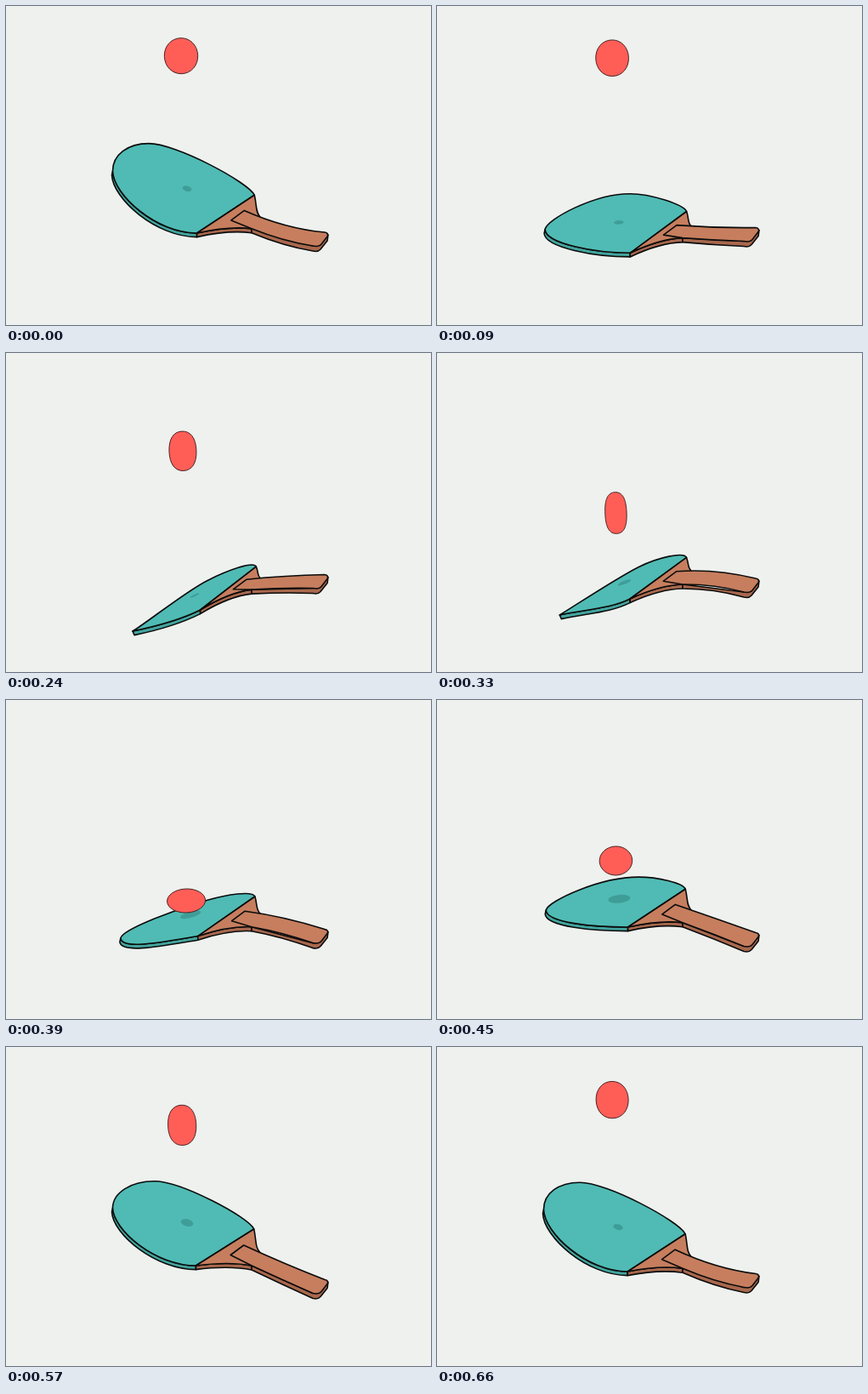
An HTML page with a canvas for the animation above (0.69 s loop, 500 by 375 pixels).

```html
<!DOCTYPE html>
<html lang="en">
<head>
<meta charset="utf-8">
<title>Bouncing ball</title>
<style>
html, body { margin: 0; width: 100%; height: 100%; overflow: hidden; background: #eef1ee; }
canvas { display: block; }
</style>
</head>
<body>
<canvas id="stage" width="500" height="375"></canvas>
<script>
const ctx = document.getElementById('stage').getContext('2d');
const LOOP = 690, STEP = 30;
const INK = '#0b0b0b', TEAL = '#4fbbb4', TEAL_SIDE = '#42a49d', WOOD = '#c67e5e', WOOD_SIDE = '#a8684d';

// Key poses: time, paddle height, handle end height, blade tip height
const PADDLE = [
  [0, 267, 267, 194], [150, 303, 259, 309], [240, 302, 261.5, 327], [330, 289, 266, 308],
  [450, 267, 274.5, 247], [570, 257, 274.5, 189], [660, 264, 267.5, 191]
];
// Ball: time, half width, half height
const SQUASH = [
  [0, 19.7, 21], [240, 16, 23.2], [345, 14, 22.8], [390, 22.5, 14], [450, 19.3, 17], [570, 16.6, 23.6]
];

const clamp = v => Math.min(1, Math.max(0, v));

// Smooth periodic interpolation through the key poses
function sample(rows, t) {
  const n = rows.length;
  const row = i => rows[(i + n) % n];
  const time = i => row(i)[0] + LOOP * Math.floor(i / n);
  let i = n - 1;
  while (rows[i][0] > t) i--;
  const slope = (k, c) => (row(k + 1)[c] - row(k)[c]) / (time(k + 1) - time(k));
  const tangent = (k, c) => {
    const before = time(k) - time(k - 1), after = time(k + 1) - time(k);
    return (slope(k - 1, c) * after + slope(k, c) * before) / (before + after);
  };
  const h = time(i + 1) - time(i), u = (t - time(i)) / h, v = 1 - u;
  return row(i).slice(1).map((a, j) => {
    const c = j + 1, b = row(i + 1)[c];
    return a * v * v * (1 + 2 * u) + b * u * u * (3 - 2 * u)
      + h * u * v * (v * tangent(i, c) - u * tangent(i + 1, c));
  });
}

function shape(d, fill, width = 1.6, ink = INK) {
  const path = new Path2D(d);
  ctx.fillStyle = fill;
  ctx.fill(path);
  ctx.lineWidth = width;
  ctx.strokeStyle = ink;
  ctx.stroke(path);
}

// How far the blade has flattened and bent, from the tip's drop below the joint
function bladeState(height, tipY) {
  const drop = tipY - height;
  const flat = clamp((drop + 73) / 98);
  return { drop, flat, slide: clamp(flat / .54), slant: clamp((drop + 20) / 38), sharp: clamp((drop - 2) / 16) };
}

function drawBlade(joint, top, tipY, { drop, flat, slide, slant, sharp }) {
  const tip = [125.5 + 23.5 * flat ** 3.5, tipY];
  const at = ([x, y], dx, dy) => [x + dx, y + dy];
  const crest = at([168 + 69 * slide, top[1]], 0, .83 * drop + 2.5 * slide - 7 * sharp);
  const back = 25 + 20 * (slide - slant), ahead = 32 - 9 * slide;
  const upper = `C${at(tip, 3 * slide + 15 * sharp, 8 * slide - 19)} ${at(crest, -back, back * slant / 2)} ${crest}
    C${at(crest, ahead, -ahead * slant / 2)} ${at(top, 4 * slide - 7, 8 * slide - 15)} ${top}`;
  const low1 = at(tip, 1 + 33 * sharp, 28 - 13 * slide - 22 * sharp);
  const low2 = at(joint, 8 * slide + 18 * sharp - 48, 11 * slant);
  const lower = `L${joint} C${low2} ${low1} ${tip}Z`;
  const dx = 3 * sharp - 1, dy = 4.6;
  shape(`M${tip} L${at(tip, dx, dy)} C${at(low1, dx, dy)} ${at(low2, 0, dy)} ${at(joint, 0, dy)} ${lower}`, TEAL_SIDE);
  shape(`M${tip} ${upper} ${lower}`, TEAL);
}

function drawHandle([jx, jy], [topX, topY], endY, t) {
  const rise = jy - 257;
  const hx = 280 + (jx - 224) * .6, hy = 233 + .74 * rise;
  const kx = 289, ky = 257 + .47 * rise;
  const bow = 8 * Math.cos(2 * Math.PI * (t + 15) / LOOP) ** 3;

  const neckY = ky - 5 + (jy - ky) * .35;
  shape(`M${jx} ${jy} v4.6 Q262 ${neckY + 4.6} ${kx} ${ky + 5} V${ky} Q262 ${neckY} ${jx} ${jy}Z`, WOOD_SIDE);

  const py = hy + .2 * (endY - hy) + .32 * bow, drop = py - topY;
  shape(`M${topX} ${topY} C${topX + 3} ${topY + drop * .5} ${topX + 1} ${py - drop * .25} 299 ${py}
    L${kx} ${ky} Q262 ${neckY} ${jx} ${jy}Z`, WOOD);

  const midY = (ky + endY + 15) / 2 + bow * .6;
  shape(`M${kx} ${ky} v5 Q326 ${midY + 5.5} 361 ${endY + 21} q6 1.5 9 -2 l8 -10 l1 -7 L361 ${endY + 15}Z`, WOOD_SIDE);
  shape(`M${hx} ${hy} Q328 ${(hy + endY) / 2 + bow} 375 ${endY - 1} q5 1 3 5 l-7 9 q-3 3.5 -10 2
    Q326 ${midY} ${kx} ${ky} L${hx - 15.5} ${hy + 11.5}Z`, WOOD);
}

function drawShadow(height, { drop, flat, slant }, depth) {
  const rx = (5.5 + depth * .057) * (1 - .35 * slant);
  ctx.fillStyle = '#3f9d97';
  ctx.beginPath();
  ctx.ellipse(213 + 9 * flat ** 3, height - 26 + .36 * drop, rx, rx * (.58 - .38 * flat),
    (16 - 41 * flat) * Math.PI / 180, 0, 2 * Math.PI);
  ctx.fill();
}

// Distance of the ball below its highest point; the last value is the paddle
function ballDepth(t) {
  const fall = 130 * (Math.abs(t - 30) / 300) ** 2.3;
  const rise = 131 * ((720 - t) / 270) ** 2.3;
  return Math.min(fall, rise, 178);
}

function drawBall(t, depth) {
  const [rx, ry] = sample(SQUASH, t);
  const k = .55 + .27 * Math.max(0, 1 - rx / ry), kx = rx * k, ky = ry * k;
  ctx.save();
  ctx.translate(206 + depth * .034, 58 + depth);
  ctx.rotate(-.04);
  shape(`M0 ${-ry} C${kx} ${-ry} ${rx} ${-ky} ${rx} 0 C${rx} ${ky} ${kx} ${ry} 0 ${ry}
    C${-kx} ${ry} ${-rx} ${ky} ${-rx} 0 C${-rx} ${-ky} ${-kx} ${-ry} 0 ${-ry}Z`, '#ff5e57', .9, '#3a1a1a');
  ctx.restore();
}

function frame() {
  const t = Math.floor(performance.now() % LOOP / STEP) * STEP;
  const [height, endY, tipY] = sample(PADDLE, t);
  const blade = bladeState(height, tipY), depth = ballDepth(t);
  const joint = [224 + .115 * (height - 262), height];
  const top = [292 + (joint[0] - 224) / 2, 214 + .826 * (height - 257)];
  ctx.fillStyle = '#eef1ee';
  ctx.fillRect(0, 0, 500, 375);
  ctx.lineJoin = 'round';
  drawBlade(joint, top, tipY, blade);
  drawHandle(joint, top, endY, t);
  drawShadow(height, blade, depth);
  drawBall(t, depth);
  requestAnimationFrame(frame);
}
frame();
</script>
</body>
</html>
```
